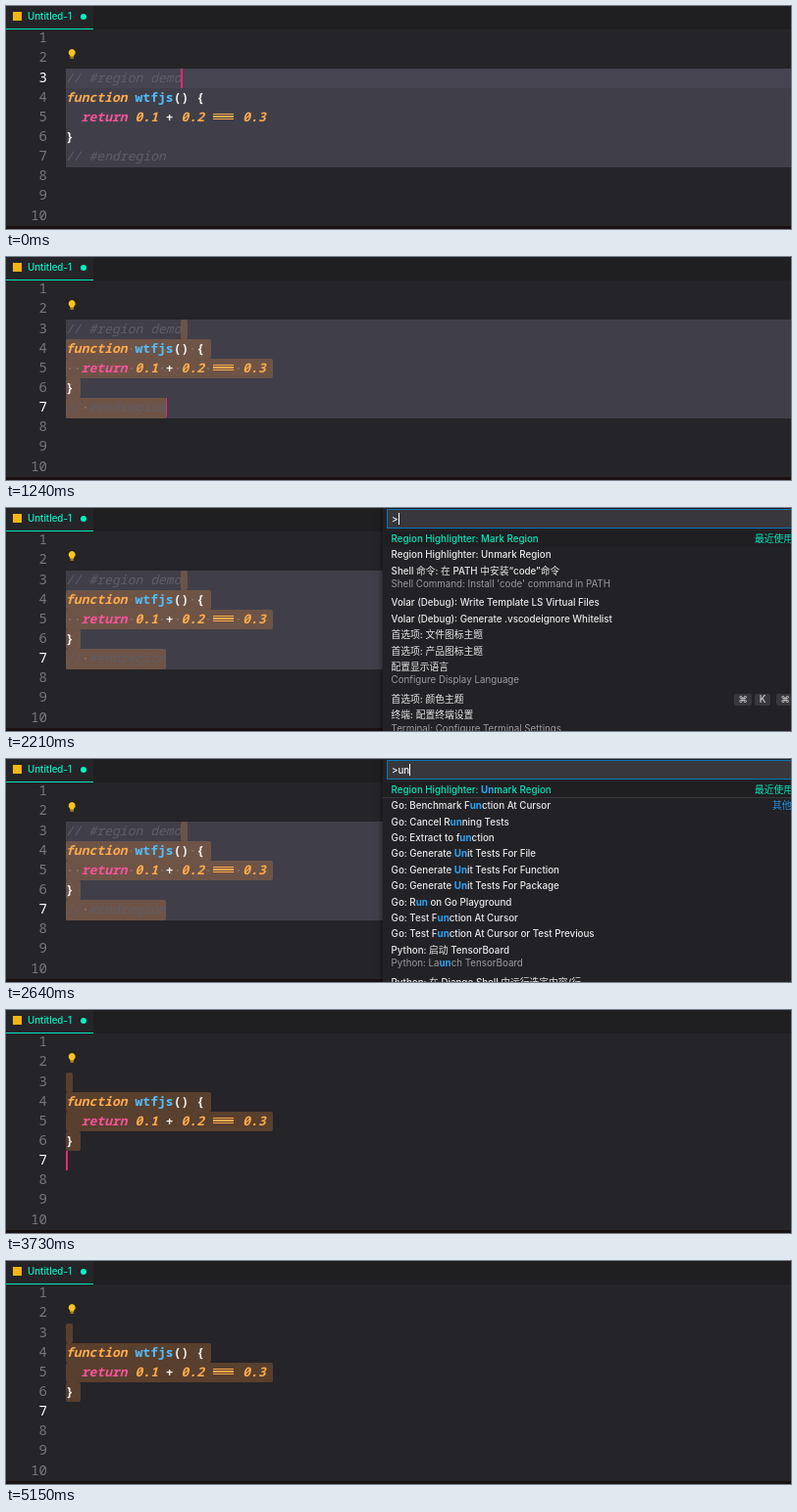
An HTML page that plays this animation: 800 px wide and 228 px high, repeating every 5180 ms.

```html
<!DOCTYPE html>
<html lang="zh-CN">
<head>
<meta charset="utf-8">
<title>Region highlighter</title>
<style>
html, body { margin: 0; width: 100%; height: 100%; overflow: hidden; background: #252428; }
#stage { position: relative; width: 800px; height: 228px; overflow: hidden; background: #252428;
  font: 500 9.75px/16.4px Inter, "Noto Sans CJK SC", "Noto Sans CJK", "DejaVu Sans", sans-serif; color: #e9e9ea; }
#stage div, #stage svg { position: absolute; white-space: pre; }

#tabs { left: 0; top: 0; width: 800px; height: 23.5px; background: #1f1e21; }
#tab { left: 0; top: 0; width: 89px; height: 22.5px; background: #252428; border-bottom: 1.5px solid #00e8bd; }
#tab div { left: 22px; top: 3px; color: #00f5c6; }
#tab .icon { left: 7px; top: 6px; width: 9px; height: 9px; background: #f7b614; }
#tab .dot { left: 76px; top: 7.6px; width: 6px; height: 6px; border-radius: 50%; background: #00f5c6; }
#foot { left: 0; top: 225px; width: 800px; height: 3px; background: #1a1113; }

#text { top: -1.3px; font: 600 13px/20.15px "Noto Sans Mono", "DejaVu Sans Mono", monospace; letter-spacing: .03px; }
.line { left: 61px; color: #f2f2f0; }
.num { left: 0; width: 42px; text-align: right; color: #77767c; font-weight: 400; font-size: 14px; }
.num.on { color: #fff; }
#region { left: 61px; top: 64px; width: 739px; height: 100.5px; background: #403f49; }
#row { left: 61px; top: 64px; width: 739px; height: 20px; background: #454450; }
.sel { background: rgba(255, 150, 62, .24); border-radius: 2px; }
#pair { width: 15.7px; height: 19px; background: rgba(120, 150, 120, .45); }
#caret { width: 1.5px; height: 20px; background: #f0286f; }
.kw { color: #ffaa4c; font-style: italic; }
.ret { color: #f7549c; font-style: italic; }
.fn { color: #53bdfa; }
.rem { color: #5f5e68; font-style: italic; font-weight: 400; }
.pair .br { color: #5cf03c; }
#text s { text-decoration: none; }
.dots s { background: radial-gradient(circle at 50% 55%, rgba(139, 125, 120, .6) .7px, transparent 1.2px); }
.eq { display: inline-block; width: 21.5px; height: 6px; margin: 0 1px; vertical-align: 1.6px;
  background: linear-gradient(#ffaa4c 1.2px, transparent 1.2px 2.4px, #ffaa4c 2.4px 3.6px, transparent 3.6px 4.8px, #ffaa4c 4.8px); }

#palette { left: 384px; top: 0; width: 430px; background: #222125; box-shadow: 0 0 6px rgba(0, 0, 0, .65); overflow: hidden; }
#input { left: 4px; top: 1px; width: 430px; height: 18px; line-height: 19px; background: #38373c;
  border: 1px solid #0a78b4; text-indent: 4px; color: #f4f4f4; }
#input i { display: inline-block; width: 1px; height: 12px; vertical-align: -2px; background: #fff; }
.item { left: 0; width: 430px; height: 16.4px; text-indent: 8.6px; }
.item .sub { left: 0; top: 13.6px; color: #9b9a9e; font-weight: 400; }
.item.focus { color: #00e9bc; background: #1f1e21; }
.item b { color: #2aa5fb; font-weight: 700; }
.item .tag { left: 379px; top: 0; text-indent: 0; }
.item.split { box-shadow: 0 -1px #38373c; }
.item.split .tag { left: 397px; color: #2492e6; }
.key { top: 2px; height: 12.5px; line-height: 12.5px; text-indent: 0; text-align: center;
  background: #38373b; border-radius: 2px; color: #d0d0d2; }
</style>
</head>
<body>
<div id="stage">
  <div id="region"></div>
  <div id="row"></div>
  <div id="marks"></div>
  <div id="pair"></div>
  <div id="text"></div>
  <div id="caret"></div>
  <svg style="left:62px;top:43px" width="11" height="12">
    <path d="M5.2 1a3.6 3.6 0 0 1 2 6.5v1.3h-4V7.5A3.6 3.6 0 0 1 5.2 1z" fill="#ffc51a"/>
    <path d="M3.5 10h3.4" stroke="#d8a31a" stroke-width="1.3"/>
  </svg>
  <div id="tabs"><div id="tab"><div class="icon"></div><div>Untitled-1</div><div class="dot"></div></div></div>
  <div id="foot"></div>
  <div id="palette"><div id="input"></div><div id="list" style="left:0;top:0"></div></div>
</div>
<script>
const LOOP = 5180, CH = 7.83, LH = 20.15, ROW = 16.4;
const $ = id => document.getElementById(id);
const lineTop = n => 63.8 + (n - 3) * LH;
const colX = c => 61 + c * CH;
const show = (id, on) => $(id).style.display = on ? 'block' : 'none';
const tok = (cls, s) => `<span class="${cls}">${s}</span>`;

const source = {
  3: tok('rem', '// #region demo'),
  4: tok('kw', 'function') + ' ' + tok('fn', 'wtfjs') + tok('br', '()') + ' {',
  5: '  ' + tok('ret', 'return') + ' ' + tok('kw', '0.1') + ' + ' + tok('kw', '0.2') +
     ' ' + tok('eq', '') + ' ' + tok('kw', '0.3'),
  6: '}',
  7: tok('rem', '// #endregion')
};
// wrap the spaces between tags, so that they can show a dot
const spaced = html => html.replace(/ (?![^<]*>)/g, '<s> </s>');

for (let n = 1; n <= 10; n++) {
  const style = `style="top:${lineTop(n)}px"`;
  $('text').innerHTML += `<div class="num" id="n${n}" ${style}>${n}</div>` +
    (source[n] ? `<div class="line" id="l${n}" ${style}>${spaced(source[n])}</div>` : '');
}
$('text').style.width = '800px';

// label | second line
const allCommands = [
  'Region Highlighter: Mark Region', 'Region Highlighter: Unmark Region',
  "Shell 命令: 在 PATH 中安装“code”命令|Shell Command: Install 'code' command in PATH",
  'Volar (Debug): Write Template LS Virtual Files',
  'Volar (Debug): Generate .vscodeignore Whitelist',
  '首选项: 文件图标主题', '首选项: 产品图标主题',
  '配置显示语言|Configure Display Language',
  '首选项: 颜色主题', '终端: 配置终端设置|Terminal: Configure Terminal Settings'
];
const unCommands = [
  'Region Highlighter: Unmark Region', 'Go: Benchmark Function At Cursor',
  'Go: Cancel Running Tests', 'Go: Extract to function',
  'Go: Generate Unit Tests For File', 'Go: Generate Unit Tests For Function',
  'Go: Generate Unit Tests For Package', 'Go: Run on Go Playground',
  'Go: Test Function At Cursor', 'Go: Test Function At Cursor or Test Previous',
  'Python: 启动 TensorBoard|Python: Launch TensorBoard',
  'Python: 在 Django Shell 中运行选定内容/行|Python: Run Selection/Line in Django Shell'
];
const keys = [['⌘', 358, 18], ['K', 379, 16], ['⌘', 401, 18]]
  .map(([k, x, w]) => `<div class="key" style="left:${x}px;width:${w}px">${k}</div>`).join('');

function drawPalette(query) {
  show('palette', query !== null);
  if (query === null) return;
  const items = !query ? allCommands : query.length < 3 ? unCommands : unCommands.slice(0, 1);
  const mark = s => query ? s.replace(new RegExp(query, 'i'), '<b>$&</b>') : s;
  let y = 23.7;
  $('list').innerHTML = items.map((item, i) => {
    const [label, sub] = item.split('|');
    const split = query && i === 1;
    const html = `<div class="item ${i ? '' : 'focus'} ${split ? 'split' : ''}" style="top:${y}px">${mark(label)}` +
      (sub ? `<div class="sub">${mark(sub)}</div>` : '') +
      (i ? '' : '<div class="tag">最近使用</div>') +
      (split ? '<div class="tag">其他命令</div>' : '') +
      (label.endsWith('颜色主题') ? keys : '') + '</div>';
    y += sub ? ROW * 2 : ROW;
    return html;
  }).join('');
  $('palette').style.height = Math.min(y + 3, 228) + 'px';
  $('input').innerHTML = '&gt;' + query + '<i></i>';
}

function place(id, col, line) {
  $(id).style.left = colX(col) + 'px';
  $(id).style.top = lineTop(line) + 'px';
}

function drawEditor(head, done, caretOn) {
  const len = { 3: done ? 0 : 15, 4: 18, 5: 26, 6: 1, 7: done ? 0 : 13 };
  const anchor = len[3], headCol = Math.min(15, len[head]);
  let marks = '';
  for (let n = 3; n <= head; n++) {
    const from = n === 3 ? anchor : 0;
    const to = n === head ? headCol : len[n] + .9;
    if (to > from) marks += `<div class="sel" style="left:${colX(from)}px;top:${lineTop(n)}px;` +
      `width:${(to - from) * CH}px;height:${LH}px"></div>`;
  }
  $('marks').innerHTML = marks;
  for (let n = 1; n <= 10; n++) $('n' + n).classList.toggle('on', n === head);
  for (const id of ['l3', 'l7', 'region']) show(id, !done);
  for (const n of [4, 5, 7]) $('l' + n).classList.toggle('dots', head === 7 && !done);
  $('text').classList.toggle('pair', head === 4);
  show('row', head === 3);
  show('pair', head === 4);
  show('caret', caretOn);
  place('pair', 14, 4);
  place('caret', headCol, head);
}

const moves = [0, 580, 760, 950, 1130];
const OPEN = 1760, CLOSE = 3420, CLEARED = 3550;
const typed = [2360, 2540, 2770, 2890, 3010, 3150];
const passed = (times, t) => times.filter(x => x <= t).length;

let last = '';
function frame() {
  const t = performance.now() % LOOP;
  const head = 2 + passed(moves, t), done = t >= CLEARED;
  const open = t >= OPEN && t < CLOSE;
  const query = open ? 'unmark'.slice(0, passed(typed, t)) : null;
  const since = t - (done ? CLEARED : moves[head - 3]);
  const caretOn = !open && since % 1000 < 500;
  const state = JSON.stringify([head, done, query, caretOn]);
  if (state !== last) {
    last = state;
    drawEditor(head, done, caretOn);
    drawPalette(query);
  }
  requestAnimationFrame(frame);
}
frame();
</script>
</body>
</html>
```
